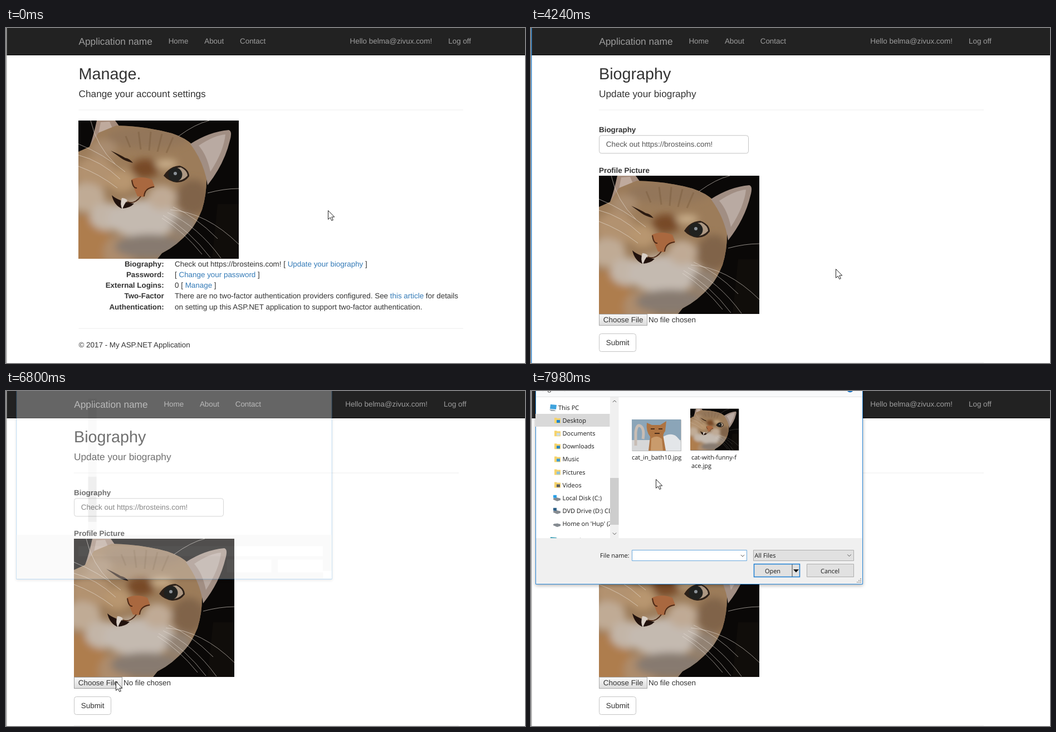
Recreate the animation shown at these times as an HTML page. Size 932 px wide and 601 px high, loop 8000 ms.

```html
<!DOCTYPE html>
<html lang="en">
<head>
<meta charset="utf-8">
<title>Account settings</title>
<style>
  html, body { margin: 0; width: 100%; height: 100%; overflow: hidden; background: #fff; }
  svg { display: block; width: 100%; height: 100%; text-rendering: geometricPrecision; }
  text { font: 13.42px "Liberation Sans", Arial, sans-serif; fill: #333; white-space: pre; }
  .b { font-weight: bold; }
  .end { text-anchor: end; }
  .mid { text-anchor: middle; }
  .big { font-size: 28.75px; }
  .sub, .brand { font-size: 17.25px; }
  .nav text { fill: #9d9d9d; }
  .link { fill: #337ab7; }
  .hot { fill: #23527c; text-decoration: underline; }
  .hr { fill: #eee; }
  .field { fill: #fff; stroke: #c4c4c4; }
  #dialog text { font: 11px "Open Sans", "Noto Sans", sans-serif; fill: #1a1a1a; }
  .btn { fill: #e1e1e1; stroke: #adadad; }
  .chev { fill: none; stroke: #555; }
</style>
</head>
<body>
<svg viewBox="0 0 932 601" preserveAspectRatio="none">
  <defs>
    <clipPath id="frame"><path d="M0 0H288V248H0Z"/></clipPath>
    <clipPath id="head"><path d="M20 47L36 22L68 9Q120 10 168 23Q192 31 207 45Q222 68 230 99Q231 130 222 160Q212 185 200 198Q178 224 150 238L142 248H0V56Z"/></clipPath>
    <clipPath id="side"><path d="M8 11H141.5V264H8Z"/></clipPath>
    <clipPath id="bath"><path d="M181 51H269V107H181Z"/></clipPath>
    <filter id="soft" x="-50%" y="-50%" width="200%" height="200%"><feGaussianBlur stdDeviation="7"/></filter>
    <filter id="shade" x="-5%" y="-5%" width="110%" height="112%"><feDropShadow dx="0" dy="2" stdDeviation="3" flood-opacity=".3"/></filter>
    <linearGradient id="grey" x2="0" y2="1"><stop stop-color="#f8f8f8"/><stop offset="1" stop-color="#dcdcdc"/></linearGradient>

    <g id="photo" clip-path="url(#frame)">
      <path d="M0 0H288V248H0Z" fill="#0a0807"/>
      <path d="M250 150H288V248H240Z" fill="#100d0a"/>
      <path d="M33 0H66Q72 8 80 20L30 50L20 47Q27 28 33 0Z" fill="#a48b7b"/>
      <path d="M40 3L56 2L62 16L34 34Z" fill="#bfaa9d"/>
      <g clip-path="url(#head)">
        <path d="M0 0H288V248H0Z" fill="#9c7c5a"/>
        <g filter="url(#soft)">
          <ellipse cx="125" cy="30" rx="75" ry="20" fill="#93765a"/>
          <ellipse cx="45" cy="50" rx="24" ry="16" fill="#a98c70"/>
          <ellipse cx="30" cy="95" rx="36" ry="30" fill="#b2926f"/>
          <ellipse cx="14" cy="138" rx="34" ry="26" fill="#c0ab95"/>
          <ellipse cx="14" cy="218" rx="44" ry="50" fill="#ae7d4e"/>
          <ellipse cx="74" cy="236" rx="30" ry="30" fill="#ad8c6c"/>
          <ellipse cx="52" cy="172" rx="32" ry="25" fill="#c3b5a7"/>
          <ellipse cx="118" cy="176" rx="66" ry="34" fill="#c4bab0"/>
          <ellipse cx="150" cy="138" rx="26" ry="22" fill="#c0aa95"/>
          <ellipse cx="128" cy="226" rx="62" ry="22" fill="#877a6f"/>
          <ellipse cx="206" cy="138" rx="30" ry="32" fill="#80644a"/>
          <ellipse cx="190" cy="190" rx="24" ry="22" fill="#928273"/>
          <ellipse cx="78" cy="108" rx="24" ry="20" fill="#b8966f"/>
          <ellipse cx="120" cy="86" rx="25" ry="17" fill="#774a28"/>
          <ellipse cx="158" cy="78" rx="20" ry="8" fill="#cbb08c"/>
        </g>
        <path d="M85 28L93 48M108 20L112 52M130 20L127 54M150 24L142 56M170 30L158 58" stroke="#745637" stroke-width="3" opacity=".35"/>
      </g>
      <path d="M201 42Q235 20 270 17Q277 19 272 36Q262 78 232 116Q226 75 201 42Z" fill="#a18e83"/>
      <path d="M216 45Q245 26 264 25Q261 55 237 92Q231 62 216 45Z" fill="#b9aaa2"/>
      <path d="M58 54Q76 62 84 67Q92 68 98 76Q84 73 76 67Z" fill="#2b1a10"/>
      <path d="M153 99Q163 82 182 81Q199 87 199 100Q190 112 176 111Q162 109 153 99Z" fill="#2c2018"/>
      <path d="M162 97Q171 84 184 84Q196 90 196 99Q188 108 176 108Q166 106 162 97Z" fill="#ad9883"/>
      <circle cx="174" cy="97" r="12.5" fill="#20211f"/>
      <circle cx="174" cy="95" r="3" fill="#8b9298"/>
      <path d="M95 106Q113 98 132 106L137 119L121 125L118 137L106 136L101 124Z" fill="#a9683f"/>
      <path d="M96 107Q98 122 105 121M118 136Q119 121 136 119M112 136Q101 151 88 146" fill="none" stroke="#4b2815" stroke-width="2"/>
      <path d="M60 134Q72 145 100 149Q93 157 78 158Q64 152 60 134Z" fill="#21120d"/>
      <path d="M78 139Q84 139 88 143Q81 151 79 160Q74 150 78 139Z" fill="#d8cec5"/>
      <path d="M160 165Q215 190 256 247M152 170Q200 197 237 246M150 175Q190 200 222 240M165 160Q230 165 288 222M170 155Q210 172 250 212M232 130Q262 122 288 122M0 42Q45 60 84 92M0 62Q40 72 75 105M0 82Q38 96 70 121M22 0Q32 45 66 78M180 28Q210 6 235 0" fill="none" stroke="#e8e0d8" opacity=".6"/>
    </g>
    <path id="chev" class="chev" d="M-3.2 -1.6L0 1.6L3.2 -1.6"/>
  </defs>

  <path d="M0 0H932V601H0Z" fill="#fff"/>
  <path d="M0 0H932V48H0Z" fill="#222"/>
  <path d="M0 48H932V49H0Z" fill="#080808"/>
  <path id="edge" d="M0 0H1.5V601H0Z"/>

  <g id="nav" class="nav">
    <text class="brand" x="130.5" y="29.7">Application name</text>
    <text x="291.7" y="28.3">Home</text>
    <text x="356.2" y="28.3">About</text>
    <text x="420" y="28.3">Contact</text>
    <text x="617.5" y="28.3">Hello belma@zivux.com!</text>
    <text x="794.3" y="28.3">Log off</text>
  </g>

  <g id="manage">
    <text class="big" x="130.5" y="92.3">Manage.</text>
    <text class="sub" x="130.5" y="123.7">Change your account settings</text>
    <path class="hr" d="M130.5 146.5H821V147.5H130.5Z"/>
    <use href="#photo" x="130" y="166"/>
    <text class="b end" x="283.7" y="427.8">Biography:</text>
    <text class="b end" x="283.7" y="447">Password:</text>
    <text class="b end" x="283.7" y="466.2">External Logins:</text>
    <text class="b end" x="283.7" y="485.3">Two-Factor</text>
    <text class="b end" x="283.7" y="504.5">Authentication:</text>
    <text x="303" y="427.8">Check out https://brosteins.com! [ <tspan id="link" class="link">Update your biography</tspan> ]</text>
    <text x="303" y="447">[ <tspan class="link">Change your password</tspan> ]</text>
    <text x="303" y="466.2">0 [ <tspan class="link">Manage</tspan> ]</text>
    <text x="303" y="485.3">There are no two-factor authentication providers configured. See <tspan class="link">this article</tspan> for details</text>
    <text x="303" y="504.5">on setting up this ASP.NET application to support two-factor authentication.</text>
    <path class="hr" d="M130.5 538.5H821V539.5H130.5Z"/>
    <text x="130.5" y="572.6">© 2017 - My ASP.NET Application</text>
  </g>

  <g id="bio">
    <text class="big" x="122" y="92.3">Biography</text>
    <text class="sub" x="122" y="123.7">Update your biography</text>
    <path class="hr" d="M122 146.5H813V147.5H122Z"/>
    <text class="b" x="122" y="187">Biography</text>
    <rect class="field" x="122.5" y="192.8" width="268" height="32" rx="4"/>
    <text x="134.8" y="213.3" style="fill:#555">Check out https://brosteins.com!</text>
    <text class="b" x="122" y="260">Profile Picture</text>
    <use href="#photo" x="122" y="265"/>
    <rect id="choose" x="122.5" y="513.5" width="86" height="20" fill="url(#grey)" stroke="#a9a9a9"/>
    <text x="129.8" y="527.7">Choose File</text>
    <text x="211" y="527.7">No file chosen</text>
    <rect class="field" x="122.5" y="548.5" width="66" height="32" rx="4"/>
    <text x="134.8" y="569">Submit</text>
    <path class="hr" d="M122 600H813V601H122Z"/>
  </g>

  <g id="dialog">
    <path d="M8.5 -30H595.5V346.5H8.5Z" fill="#fff" stroke="#2585d6" filter="url(#shade)"/>
    <path d="M9 264H595V346H9Z" fill="#f0f0f0"/>
    <path d="M142 11H157.5V264H142Z" fill="#f0f0f0"/>
    <path d="M142 156H157.5V240H142Z" fill="#cdcdcd"/>
    <use href="#chev" transform="translate(150 18.5) scale(1 -1)"/>
    <use href="#chev" x="150" y="256"/>
    <path d="M124 285H579V304H124ZM400 310H483V334H400ZM495 310H579V334H495ZM579 331H595V345H579Z" fill="#fff"/>
    <g id="content">
      <path d="M9 -29H595V10H9Z" fill="#f8f9fa"/>
      <path d="M9 10H595V11H9Z" fill="#e2e3e4"/>
      <text x="17" y="0">Organize</text>
      <circle cx="573" cy="-4" r="6.5" fill="#1c74c4"/>
      <g id="tree" clip-path="url(#side)"><path d="M8 41H142V64H8Z" fill="#d9d9d9"/></g>

      <path d="M181.5 51.5H270V108H181.5Z" fill="#bbb"/>
      <g clip-path="url(#bath)">
        <path d="M181 51H269V107H181Z" fill="#8ba5b8"/>
        <path d="M181 88H269V107H181Z" fill="#d6d7d8"/>
        <path d="M188 98V74Q190 58 197 63T201 86" fill="none" stroke="#c8bdb4" stroke-width="5"/>
        <path d="M237 82Q258 70 269 92V107H237Z" fill="#e3e6e9"/>
        <path d="M208 57L217 61H232L243 54L241 72Q236 78 238 84L242 107H211L214 82Q206 72 208 57Z" fill="#ae7442"/>
        <path d="M216 85Q226 78 235 86L237 107H215Z" fill="#c99b6c"/>
        <path d="M215 68H222M229 68H236M222 76H231" stroke="#4a2c18" stroke-width="2"/>
      </g>
      <path d="M287 32H374V107H287Z" fill="#bbb"/>
      <use href="#photo" transform="translate(286 31.5) scale(.302)"/>
      <text x="181" y="122.5">cat_in_bath10.jpg</text>
      <text x="288" y="122.5">cat-with-funny-f</text>
      <text x="288" y="138">ace.jpg</text>

      <path d="M124 285H579V304H124ZM579 331H595V345H579Z" fill="#f0f0f0"/>
      <text class="end" x="176.5" y="299.3">File name:</text>
      <path d="M181.5 285.5H387.5V304.5H181.5Z" fill="#fff" stroke="#6aa8dc"/>
      <use href="#chev" x="380" y="295.5"/>
      <path class="btn" d="M399.5 285.5H579.5V304.5H399.5Z"/>
      <text x="401.5" y="299.3">All Files</text>
      <use href="#chev" x="571.5" y="295"/>
      <path d="M400.5 310.5H482.5V333.5H400.5Z" fill="#e1e1e1" stroke="#1f7fd2" stroke-width="1.5"/>
      <path d="M469 311V333" stroke="#444"/>
      <path d="M471 320H481L476 325.5Z" fill="#111"/>
      <text class="mid" x="434" y="326.8">Open</text>
      <path class="btn" d="M495.5 310.5H579.5V333.5H495.5Z"/>
      <text class="mid" x="537" y="326.8">Cancel</text>
      <path d="M585 343H593M588 340H593M591 337H593" stroke="#b0b0b0" stroke-width="2" stroke-dasharray="2 1"/>
    </g>
  </g>

  <g id="cursor" fill="#fff" stroke="#222" stroke-linejoin="round">
    <path id="arrow" d="M.5 .5V16.3L4.2 13L6.8 18.5L9.3 17.4L6.8 12H11.8Z"/>
    <path id="hand" transform="translate(-6.5 -.5)" d="M5 13.5V2Q5 .5 6.5 .5T8 2V8.5Q8 7 9.6 7T11 8.8Q11.2 7.6 12.6 7.7T14 9.6Q14.2 8.8 15.3 8.9T16.5 10.5V15Q16.5 18 15 19.5V21.5H7V19.5Q5 17 1.2 12.8Q.2 11.2 1.5 10.6T5 13.5Z"/>
  </g>
</svg>
<script>
  const LOOP = 8000;
  const $ = id => document.getElementById(id);
  const set = (id, name, value) => $(id).setAttribute(name, value);
  const show = (id, on) => set(id, 'display', on ? 'inline' : 'none');

  // Folder tree: label, icon and icon colour
  const folder = (y, c) => `<path d="M42 ${y - 5}h4l1 1h6v9h-11z" fill="#f5d36c"/><path d="M46 ${y - 1}h6v5h-6z" fill="${c}"/>`;
  const drive = (y, c) => `<path d="M40 ${y + 1}l5 -2l8 2v3l-6 2l-7 -3z" fill="#858b91"/><path d="M40 ${y - 5}h6v5h-6z" fill="${c}"/>`;
  const screen = (y, c) => `<path d="M35 ${y - 6}l11 1l-1 8l-11 -1z" fill="${c}"/><path d="M33 ${y + 3}l9 1l3 2l-9 0z" fill="#9aa5ad"/>`;
  const rows = [
    ['This PC', screen, '#3fa3dd'], ['Desktop', folder, '#1d83cf'], ['Documents', folder, '#c8dce9'],
    ['Downloads', folder, '#2585c9'], ['Music', folder, '#3a9ad6'], ['Pictures', folder, '#8fc3df'],
    ['Videos', folder, '#5a5f66'], ['Local Disk (C:)', drive, '#2aa0e6'], ['DVD Drive (D:) CDROM', drive, '#2d5f86'],
    ["Home on 'Hup' (Z:)", drive, '#fff'], ['Network', screen, '#3e9fb5']
  ];
  $('tree').insertAdjacentHTML('beforeend', rows.map(([label, icon, c], i) => {
    const y = 30 + 23.1 * i + (i > 9 ? 7 : 0);
    return icon(y, c) + `<text x="${icon === screen ? 49 : 56.5}" y="${y + 4}">${label}</text>`;
  }).join(''));

  // Pointer runs: start, end, number of steps, evenly timed points
  const runs = [
    [730, 1510, 11, [[578, 332], [578, 358], [574, 389], [554, 422]]],
    [1600, 1670, 2, [[557, 425], [557, 425]]],
    [4240, 4980, 10, [[547, 432], [505, 462], [455, 484], [380, 514], [300, 527]]],
    [5050, 5600, 8, [[288, 528], [245, 529], [212, 524], [197, 521]]],
    [7500, 7760, 4, [[188, 478], [183, 405], [203, 320], [227, 249]]],
    [7900, 7980, 2, [[230, 200], [224, 158]]]
  ];

  function pointer(t) {
    const run = runs.filter(r => t >= r[0]).pop();
    if (!run) return [578, 327];
    const [from, to, steps, pts] = run;
    const k = Math.min(steps - 1, Math.floor((t - from) / (to - from) * (steps - 1) + .1));
    const p = k / (steps - 1) * (pts.length - 1);
    const i = Math.min(pts.length - 2, Math.floor(p));
    return pts[i].map((v, n) => v + (pts[i + 1][n] - v) * (p - i));
  }

  // Dialog opening: time, opacity, scale
  const opening = [[0, 0, 1], [6800, .3, .965], [6870, .66, .985], [6960, .88, .995], [7030, 1, 1]];

  function draw(t) {
    const bio = t >= 3340;
    show('manage', !bio);
    show('bio', bio);
    set('nav', 'transform', `translate(${bio ? -8.3 : 0} 0)`);
    set('edge', 'fill', t >= 1850 && t < 6020 ? '#4492d4' : '#aaa');
    set('link', 'class', t >= 1600 ? 'hot' : 'link');
    set('choose', 'fill', t >= 5800 && t < 6020 ? '#dedede' : 'url(#grey)');
    set('choose', 'stroke', t >= 5500 && t < 7500 ? '#999' : '#a9a9a9');

    const [, alpha, scale] = opening.filter(o => t >= o[0]).pop();
    show('dialog', alpha > 0);
    set('dialog', 'opacity', alpha);
    set('dialog', 'transform', `translate(302 90) scale(${scale}) translate(-302 -90)`);
    show('content', t >= 6960);

    const hand = t >= 1600 && t < 3200;
    show('hand', hand);
    show('arrow', !hand);
    set('cursor', 'transform', `translate(${pointer(t)})`);
  }

  const start = performance.now();
  function tick() {
    draw((performance.now() - start) % LOOP);
    requestAnimationFrame(tick);
  }
  tick();
</script>
</body>
</html>
```
